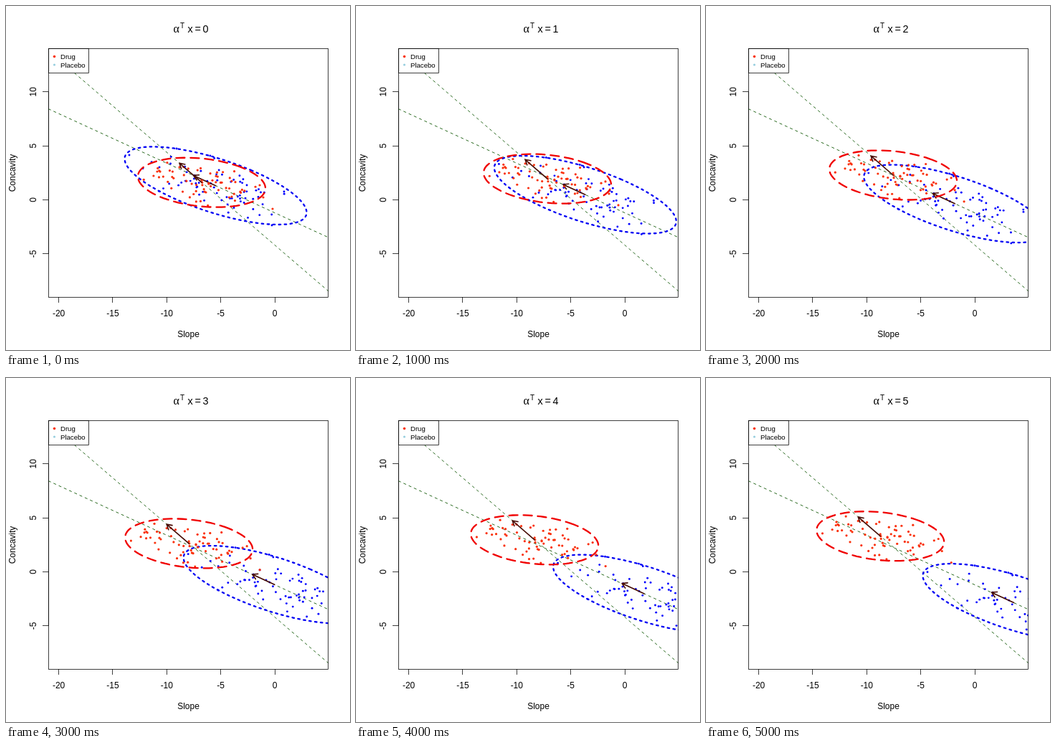
These frames come from a looping animation (480x480 px, 6000 ms). An HTML page:

```html
<!DOCTYPE html>
<html lang="en">
<head>
<meta charset="utf-8">
<title>Slope and concavity</title>
<style>
  html, body { margin: 0; width: 100%; height: 100%; overflow: hidden; background: #fff; }
  svg { display: block; width: 480px; height: 480px; font: 12px "Liberation Sans", Arial, sans-serif; }
  .mid { text-anchor: middle; }
  .frame { fill: none; stroke: #000; stroke-width: 0.75; }
  .guide { stroke: #2a6a20; stroke-dasharray: 4 4; }
  .outline { fill: none; stroke-width: 2.3; stroke-linecap: round; }
  .arrow { fill: none; stroke: #480c04; stroke-width: 1.6; stroke-linecap: round; stroke-linejoin: round; }
  .legend { font-size: 9.6px; }
  .title { font-size: 14.4px; }
</style>
</head>
<body>
<svg viewBox="0 0 480 480">
  <clipPath id="plot"><rect x="59" y="59" width="391" height="347"/></clipPath>
  <g class="title">
    <text x="233.5" y="37" font-family="Liberation Serif, Times, serif" font-size="16">α</text>
    <text x="243" y="30.5" font-size="10">T</text>
    <text x="253.5" y="37">x</text>
    <text x="263.5" y="37">=</text>
    <text x="274.5" y="37" id="value">0</text>
  </g>
  <g id="axes"></g>
  <text class="mid" x="254.5" y="462">Slope</text>
  <text class="mid" transform="translate(12.5 233) rotate(-90)">Concavity</text>
  <g id="data" clip-path="url(#plot)">
    <path class="guide" d="M59 143.5L450 323M59 62.1L450 398"/>
  </g>
  <g class="legend">
    <rect x="59.5" y="59.5" width="56" height="34" fill="#fff" stroke="#000" stroke-width="0.75"/>
    <circle cx="67.5" cy="70.5" r="1.8" fill="#fa300a"/>
    <circle cx="67.5" cy="82" r="1.6" fill="#98cfe0"/>
    <text x="76" y="74">Drug</text>
    <text x="76" y="85.5">Placebo</text>
  </g>
  <rect class="frame" x="59.5" y="59.5" width="390" height="347"/>
</svg>
<script>
const make = (parent, tag, attrs, text = "") => {
  const node = document.createElementNS("http://www.w3.org/2000/svg", tag);
  for (const key in attrs) node.setAttribute(key, attrs[key]);
  node.textContent = text;
  return parent.appendChild(node);
};

const axes = document.getElementById("axes");
for (let v = -20; v <= 0; v += 5) {
  const x = 375 + v * 15.07;
  make(axes, "path", { class: "frame", d: `M${Math.floor(x) + 0.5} 406v8` });
  make(axes, "text", { class: "mid", x, y: 433 }, v);
}
for (let v = -5; v <= 10; v += 5) {
  const y = 270.5 - v * 15.07;
  make(axes, "path", { class: "frame", d: `M59 ${Math.floor(y) + 0.5}h-8` });
  make(axes, "text", { class: "mid", transform: `translate(41.5 ${y}) rotate(-90)` }, v);
}
make(axes, "path", { class: "frame", d: "M59.5 119.5V346" });

// Seeded generator; spread() is close to a standard normal value.
let seed = 7;
const random = () => (seed = (seed * 16807) % 2147483647) / 2147483647;
const spread = () => (random() + random() + random() - 1.5) * 2;

// Ellipse with half extents a, b and correlation r, traced from the correlated axis.
function ellipsePath([cx, cy], a, b, r) {
  const phase = Math.acos(r) / 2;
  const points = Array.from({ length: 100 }, (_, i) => {
    const t = i / 99 * 2 * Math.PI;
    return `${(cx + a * Math.cos(t + phase)).toFixed(2)} ${(cy - b * Math.cos(t - phase)).toFixed(2)}`;
  });
  return "M" + points.join("L");
}

function arrowPath([x, y], [dx, dy]) {
  const tip = [x + dx, y + dy], angle = Math.atan2(dy, dx);
  const barb = turn => `${tip[0] - 8 * Math.cos(angle + turn)} ${tip[1] - 8 * Math.sin(angle + turn)}`;
  return `M${x} ${y}L${tip}M${barb(0.52)}L${tip}L${barb(-0.52)}`;
}

const clouds = [
  {
    color: "#0000ff", outline: "#0000f4", radius: 1.45, count: 80,
    center: [292.5, 250.7], step: [27.4, 12.55], arrow: [-31, -14.3],
    extent: [127, 54.3, -0.69], dash: "2.5 5.5",
    outliers: [[172, 208], [238, 199], [371, 306], [388, 259]]
  },
  {
    color: "#fa300a", outline: "#f00000", radius: 1.6, count: 66,
    center: [273, 246.2], step: [-5.95, -5.1], arrow: [-31, -26.8],
    extent: [89, 34.5, -0.24], dash: "12 8",
    outliers: [[211, 231], [354, 250], [359, 267], [372, 283]]
  }
];

// Points follow the distribution whose 95 % region is the outline.
function drawCloud(parent, { color, outline, radius, count, center, arrow, extent, dash, outliers }) {
  const group = make(parent, "g", {});
  const dot = (cx, cy) => make(group, "circle", { cx, cy, r: radius, fill: color });
  const [a, b, r] = extent;
  for (let i = 0; i < count; i++) {
    const u = spread(), v = -r * u + Math.sqrt(1 - r * r) * spread();
    if (Math.hypot(u, v) < 2.4) dot(center[0] + a / 2.45 * u, center[1] + b / 2.45 * v);
  }
  for (const [x, y] of outliers) dot(x, y);
  make(group, "path", {
    class: "outline", stroke: outline, "stroke-dasharray": dash, d: ellipsePath(center, ...extent)
  });
  make(group, "path", { class: "arrow", d: arrowPath(center, arrow) });
  return group;
}

const data = document.getElementById("data");
for (const cloud of clouds) cloud.group = drawCloud(data, cloud);

const value = document.getElementById("value");
function draw() {
  const step = Math.floor(performance.now() % 6000 / 1000);
  value.textContent = step;
  for (const { group, step: [dx, dy] } of clouds)
    group.setAttribute("transform", `translate(${dx * step} ${dy * step})`);
  requestAnimationFrame(draw);
}
draw();
</script>
</body>
</html>
```
